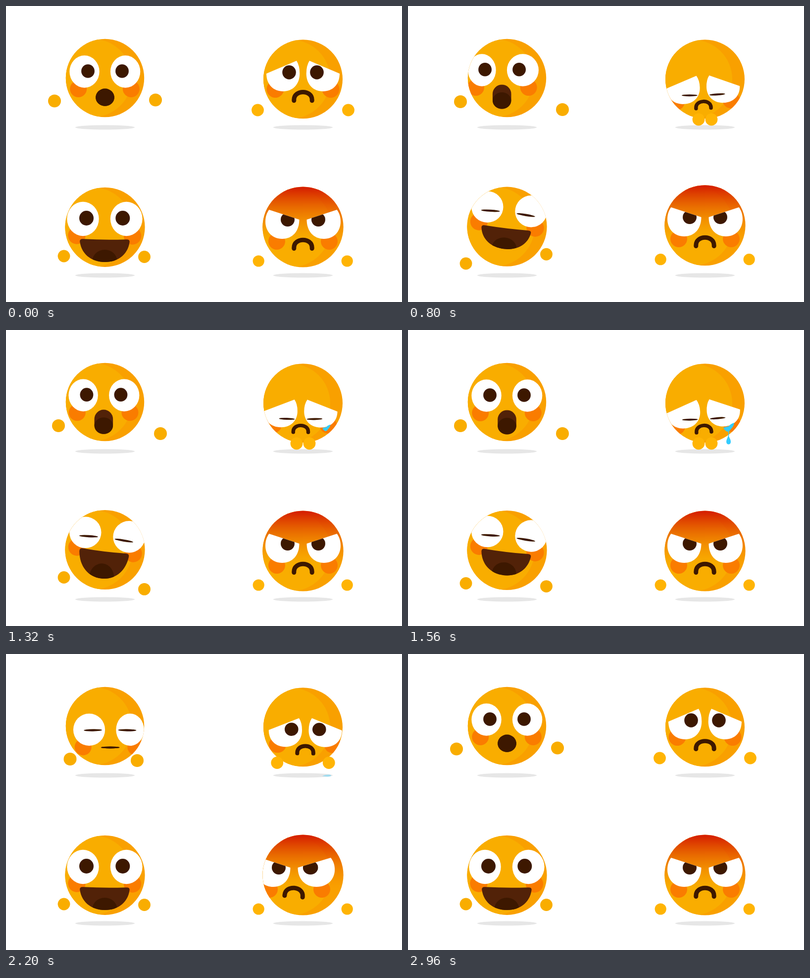
Recreate the animation shown at these times as an HTML page. Size 800x600 px, loop 3000 ms.

```html
<!DOCTYPE html>
<html lang="en">
<head>
<meta charset="utf-8">
<title>Four moods</title>
<style>
  html, body { margin: 0; width: 100%; height: 100%; overflow: hidden; background: #fff; }
  svg { display: block; width: 100vw; height: 100vh; }
</style>
</head>
<body>
<svg id="stage" viewBox="0 0 800 600"></svg>
<script>
const LOOP = 3000, STEP = 40;
const LIGHT = '#f9ad00', SHADE = '#f9a000', CHEEK = '#fa7c00', DARK = '#3d1800', MOUTH = '#522208';
const WARM = '#ffb404', TEAR = '#33ccff';

const lerp = (a, b, u) => a + (b - a) * u;
const ramp = (t, from, to) => {
  const u = Math.min(1, Math.max(0, (t - from) / (to - from)));
  return u * u * (3 - 2 * u);
};
// Eases 0 to 1 over a..b and back to 0 over c..d
const pulse = (t, a, b, c, d) => ramp(t, a, b) - ramp(t, c, d);

const ellipse = (x, y, rx, ry, fill, turn = 0) =>
  `<ellipse cx="${x}" cy="${y}" rx="${rx}" ry="${ry}" fill="${fill}" transform="rotate(${turn} ${x} ${y})"/>`;
const circle = (x, y, r, fill) => ellipse(x, y, r, r, fill);
const path = (d, fill, extra = '') => `<path d="${d}" fill="${fill}" ${extra}/>`;
const group = (transform, content) => `<g transform="${transform}">${content}</g>`;
const mirror = content => group('translate(1200 0) scale(-1 1)', content);
const clipped = (id, shape, content) =>
  `<clipPath id="${id}">${shape}</clipPath><g clip-path="url(#${id})">${content}</g>`;
const shadow = (x, y) => ellipse(x, y, 60, 4.6, '#e6e6e6');

// A round pupil that flattens into a line as the eye closes
const pupil = (x, y, r, closed, line, turn = 0) =>
  ellipse(x, y, lerp(r, line, closed), lerp(r + .4, 2.2, closed), DARK, turn * closed);

const head = (id, x, y, r, features) => circle(x, y, r, SHADE)
  + clipped(id, circle(x, y, r), circle(x - 25, y, r, LIGHT) + features);

const frown = (x, y, sx, sy, turn) =>
  group(`translate(${x} ${y}) rotate(${turn}) scale(${sx} ${sy})`,
    path('M-18.2 17.2V15.5C-18.2 -5.2 18.2 -5.2 18.2 15.5V17.2', 'none',
      `stroke="${DARK}" stroke-width="9" stroke-linecap="round"`));

function surprised(t) {
  const right = pulse(t, 160, 400, 520, 760);
  const left = pulse(t, 520, 760, 1160, 1400);
  const down = pulse(t, 1580, 1800, 2240, 2520);
  const lowered = pulse(t, 560, 800, 1580, 1780);
  const rest = pulse(t, 1620, 1740, 2260, 2400);
  const closed = rest + pulse(t, 420, 500, 530, 620);
  const line = lerp(14, 18.5, rest);

  // The gaze carries the whole face; the eye nearer the rim narrows
  const gx = 7.5 * right - 9.2 * left + 9.5 * down;
  const gy = -4 * right - 3 * left + 20.4 * down;
  const features = [-1, 1].map(side =>
    circle(199.5 + 53.3 * side + gx, 168 + gy, 17, CHEEK)
    + ellipse(199.8 + 41.3 * side + gx, 133 + gy, 30.2 - side * gx / 5, 32.7, '#fff')
    + pupil(200 + 34.5 * side + gx * 1.08, 132 + gy * 1.1, 13.4, closed, line, side)).join('');

  const gape = pulse(t, 160, 400, 1580, 1800);
  const shut = down;
  const w = 18.8, h = lerp(lerp(17.7, 24.6, gape), 2, shut);
  const mx = 200 + gx * 1.12;
  const my = 185 + 2 * gape + gy - 16 * shut - 4 * ramp(t, 2240, 2520);
  const tongue = Math.min(2 * h, 2 * w - 4);
  const slot = (height, fill) =>
    `<rect x="${mx - w}" y="${my + h - height}" width="${2 * w}" height="${height}" rx="${w}" ry="${Math.min(w, height / 2)}" fill="${fill}"/>`;
  const mouth = slot(2 * h, h > w ? MOUTH : DARK) + slot(tongue, DARK);

  const hop = -4 * (pulse(t, 160, 260, 280, 400) + pulse(t, 540, 640, 660, 780));
  return shadow(200, 246)
    + group(`translate(0 ${hop})`, head('wow', 200, 146, 79.2, features + mouth))
    + circle(98 - 12 * right + 8 * lowered + 31.5 * down, 192.5 + 31.5 * right + 1.5 * lowered + 20.5 * down, 13, LIGHT)
    + circle(302 - 8 * right + 10 * lowered - 37 * down, 190.5 - 17.5 * right + 19.5 * lowered + 25.5 * down, 13, LIGHT);
}

function tear(t) {
  let out = '';
  if (t >= 1080 && t < 1720) {
    const size = lerp(.45, 1, ramp(t, 1120, 1500)) * (1 - ramp(t, 1580, 1720));
    out += group(`translate(645 202) scale(${size})`,
      path('M14 -14Q7 -12 3 -7L-8 -4Q-5 2 0 4Q5 4 7 -1Q13 -6 14 -14Z', TEAR));
  }
  if (t >= 1480 && t < 1720) {
    const y = 212 + 30 * ((t - 1440) / 240) ** 1.4;
    if (t < 1620) out += path(`M647 204H648.4V${y - 8}H647Z`, TEAR);
    out += group(`translate(647.6 ${Math.min(y, 238)})`,
      path('M-.5 -10C2 -4 4.5 -1 4.5 3.5A4.5 5 0 0 1 -4.5 3.5C-4.5 -1 -2 -4 -.5 -10Z', TEAR));
  }
  if (t >= 1720) {
    const spread = ramp(t, 1680, 1840), left = 1 - ramp(t, 2040, 2320);
    out += `<g opacity="${left}">${group(`translate(648.5 0) scale(${spread} 1)`,
      path('M-10 247.5Q-3 244 4 244.6Q8.5 244.8 8.5 247Q6 249 -.5 248.6Z', TEAR))}</g>`;
  }
  return out;
}

function sad(t) {
  const slump = pulse(t, 160, 620, 2060, 2400);
  const closed = pulse(t, 560, 680, 2040, 2140);
  const lean = lerp(-4.5, 5, ramp(t, 1300, 2300)) * pulse(t, 560, 900, 2200, 2480);
  const tilt = 3 * Math.cos(2 * Math.PI * (t - 1120) / 880) * pulse(t, 520, 760, 2240, 2500);
  const look = 134.5 + slump + 18.5 * closed;
  const side = circle(544, 168.5, 17.5, CHEEK)
    + path('M526 137L587 111Q593.3 121 593.3 137C593.3 159 579 173 560 173C540 173 526 159 526 137Z', '#fff')
    + pupil(572, look, 13.8, closed, 15.8, 2);
  const settle = ramp(t, 2840, 2960);
  const features = group(
    `translate(${600 + lean} ${142 + 27.3 * slump}) rotate(${tilt}) scale(1 ${1 - .09 * slump}) translate(-600 -142)`,
    side + mirror(side))
    + frown(600 + lean, 174.5 + 19 * slump + 2 * settle, 1 - .17 * slump, 1 - .2 * slump - .05 * settle, tilt * 1.2);

  const inward = pulse(t, 200, 660, 2060, 2340);
  const reach = lerp(91.5, 13, inward), y = lerp(211, 230, inward);
  return shadow(600, 246) + head('sad', 600, 148.3, 80, features)
    + circle(600 - reach, y, 12.4, WARM) + circle(600 + reach, y, 12.4, WARM) + tear(t);
}

function happy(t) {
  const laugh = pulse(t, 495, 720, 1660, 1860);
  const closed = pulse(t, 580, 680, 1680, 1800);
  const at = (calm, laughing) => lerp(calm, laughing, laugh);
  const beat = phase => Math.sin(2 * Math.PI * (t - 1120) / 320 + phase);
  const shake = beat(Math.PI / 4), sway = beat(4.36);

  const eyes = circle(at(143, 143.5), at(465, 440), 17.7, CHEEK)
    + circle(at(255.5, 257), at(466, 453), 17.7, CHEEK)
    + ellipse(at(155.5, 160.3), at(431.5, 410.3), 32.2, at(34.7, 31.8), '#fff')
    + ellipse(at(243.2, 248.7), at(431.5, 419.3), 32.4, at(34.7, 32.2), '#fff')
    + pupil(at(162.5, 166.8), at(430, 418), 14.5, closed, 19, 3.5)
    + pupil(at(235.8, 238.2), at(430, 426.8), 14.5, closed, 19, 9.5);
  const grin = path('M-50.5 4Q-51 -2 -44 -1.4Q0 .8 43 -1Q50.5 -1.5 50 4C47 29 27 45 0 45S-47 29 -50.5 4Z', MOUTH);
  const mouth = group(
    `translate(${at(199.7, 199)} ${at(474, 452)}) rotate(${at(.3, 6.6)}) scale(1 ${at(1, 1.05 - .17 * shake)})`,
    grin + clipped('grin', grin, ellipse(0, 43, 25, 23, DARK)));
  const features = group(`translate(0 ${at(0, -2.8 * shake)})`, eyes) + mouth;

  return shadow(200, 546)
    + group(`translate(0 ${at(0, shake - 1.8)})`, head('joy', 200, 448.3, 80.6, features))
    + circle(117, at(507, 513.5 + 12 * shake), 12.4, LIGHT)
    + circle(279.5, at(508.5, 514.5 + 12 * sway), 12.4, LIGHT);
}

function angry(t) {
  const beat = Math.PI * (t - 120) / 400;
  const hop = t > 120 && t < 1320 ? Math.sin(beat) ** 2 : 0;
  const fists = t > 320 && t < 1120 ? Math.cos(beat) ** 2 : 0;
  const turn = pulse(t, 1620, 1840, 2260, 2560);
  const cheek = circle(547, 477, 17, CHEEK);
  const eye = path('M531.5 413L592.5 433C592.5 456 579 472 558 472C537 472 524 456 524 437C524 427 527 419 531.5 413Z', '#fff')
    + clipped('lid', path('M520 409.3L592.5 433V480H520Z'), circle(569, 433, 14, DARK));
  const face = group(`translate(${-15 * turn} 0)`, cheek + mirror(cheek))
    + group(`translate(${-18 * turn} 0)`, eye
      + group(`translate(607.5 0) scale(${1 + .09 * turn} 1) translate(-607.5 0)`, mirror(eye)))
    + frown(600 - 17.5 * turn, 474.3, 1, 1, 5 * turn);
  const features = '<rect x="510" y="360" width="180" height="130" fill="url(#rage)"/>'
    + group(`translate(0 ${-2.5 * hop})`, face);
  const y = 517 - 9.5 * fists;
  return shadow(600, 546)
    + group(`translate(0 ${-5 * hop})`, head('mad', 600, 448, 81.6, features))
    + circle(510.2, y, 11.6, WARM) + circle(689.2, y, 11.6, WARM);
}

const defs = `<defs><linearGradient id="rage" gradientUnits="userSpaceOnUse" x1="0" y1="366" x2="0" y2="476">
  <stop offset="0" stop-color="#d41a00"/><stop offset="1" stop-color="#f08000" stop-opacity="0"/>
</linearGradient></defs>`;

const stage = document.getElementById('stage');
const began = performance.now();
function draw(now) {
  const t = Math.floor((Math.max(0, now - began) % LOOP) / STEP) * STEP;
  stage.innerHTML = defs + surprised(t) + sad(t) + happy(t) + angry(t);
  requestAnimationFrame(draw);
}
draw(began);
</script>
</body>
</html>
```
